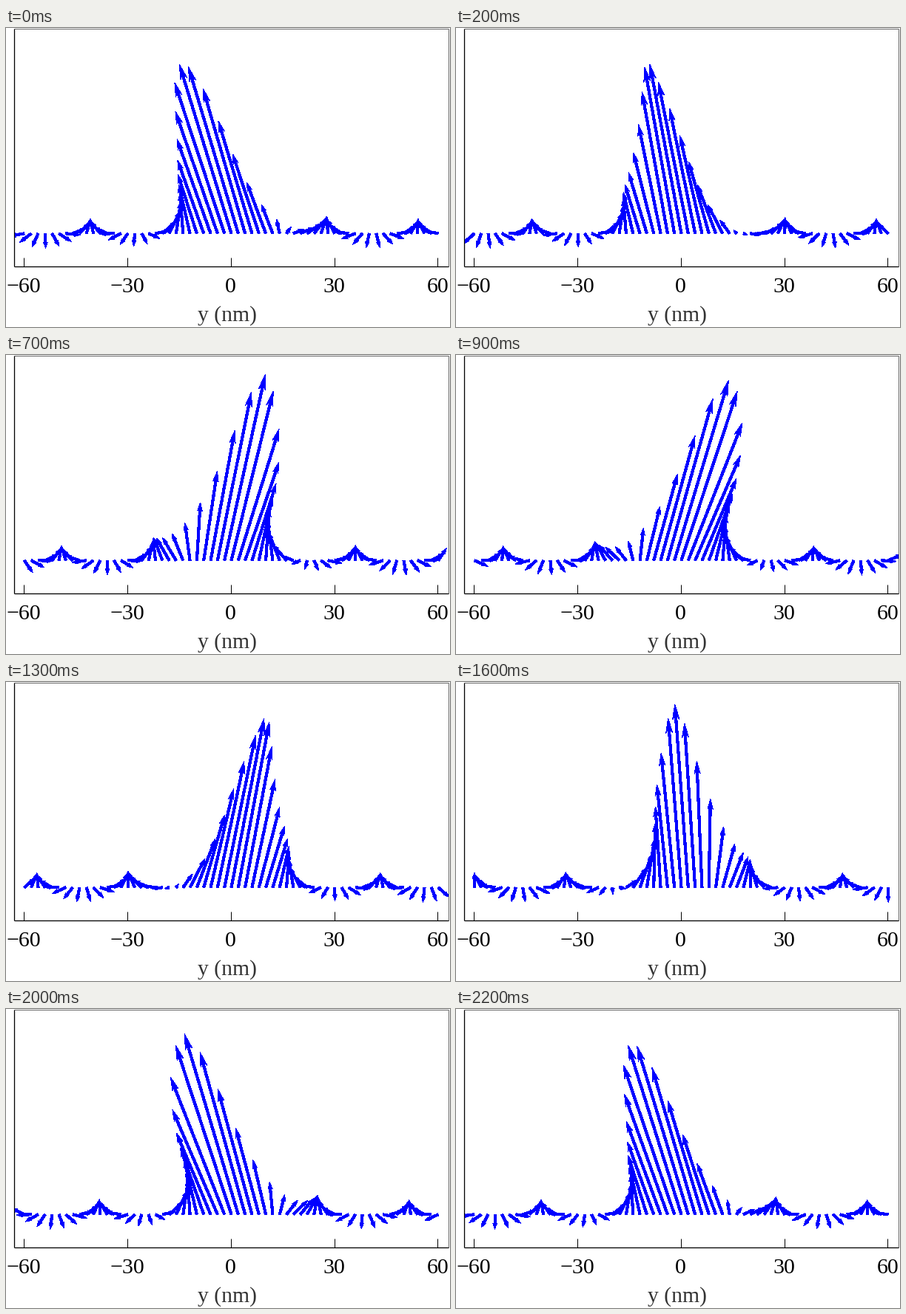
These frames come from a looping animation (600 px wide and 405 px high, 2300 ms). A matplotlib script:

```python
import numpy as np
import matplotlib.pyplot as plt
from matplotlib.animation import FuncAnimation
from matplotlib.collections import PolyCollection
from matplotlib.patches import Rectangle

W, H, DPI = 600, 405, 60
PT = 72 / DPI
FRAMES, STEP = 23, 100
LEFT, RIGHT, TOP, BOTTOM = 11, 598, 1, 323
CENTER, BASE = 304.5, 278.3
TICK_CENTER = 303.8
PITCH = 9.32            # pixels between arrows, 2 nm
PERIOD = 22.2           # in frames

n = np.arange(-30, 31)
s = n / 2.79
k = 2 * np.pi / 13.24

# Domain wall with an outgoing wave and a mode bound to the wall
sech = 1 / np.cosh(s)
wall = 229 * sech
bound = sech ** 1.55
wave = 20 * np.exp(1j * (k * abs(n) - 0.284))
wave = wave + 12 * sech - 1j * (18.5 + 5.7 * abs(n)) * bound
near = -94.3j * bound


def field(frame):
    turn = np.exp(-2j * np.pi * frame / PERIOD)
    vx = (1j * (wave - near) * turn).real
    vy = wall + np.tanh(s) * ((wave + near) * turn).real
    return vx, vy


def arrows(frame):
    """Outlines of all arrows in pixel coordinates."""
    vx, vy = field(frame)
    length = np.maximum(np.hypot(vx, vy), 1e-6)
    ux, uy = vx / length, -vy / length
    full = 7 + 0.055 * length
    head = np.minimum(full, length)
    half = (2.6 + 0.0085 * length) * head / full
    shaft = np.minimum(1.6, 0.9 * half)
    neck = length - 0.78 * head
    back = length - head
    zero = np.zeros_like(length)
    along = np.stack([zero, neck, back, length, back, neck, zero], axis=1)
    side = np.stack([shaft, shaft, half, zero, -half, -shaft, -shaft], axis=1)
    x = (CENTER + PITCH * n)[:, None] + along * ux[:, None] - side * uy[:, None]
    y = BASE + along * uy[:, None] + side * ux[:, None]
    return np.stack([x, y], axis=2)


fig = plt.figure(figsize=(W / DPI, H / DPI), dpi=DPI, facecolor="white")
ax = fig.add_axes([0, 0, 1, 1])
ax.set_xlim(0, W)
ax.set_ylim(H, 0)
ax.axis("off")


def line(x, y, color="black", width=1):
    ax.plot(x, y, color=color, lw=width * PT, solid_capstyle="butt", zorder=1)


def label(x, y, text, size, color):
    ax.text(x, y, text, family="Liberation Serif", fontsize=size * PT,
            color=color, ha="center", va="baseline")


line([LEFT, RIGHT], [TOP, TOP], "0.4")
line([RIGHT, RIGHT], [TOP, BOTTOM], "0.4")
line([LEFT, LEFT], [TOP, BOTTOM], width=1.3)
line([LEFT, RIGHT], [BOTTOM, BOTTOM], width=1.3)

for nm in range(-60, 61, 30):
    x = TICK_CENTER + PITCH * nm / 2
    line([x, x], [BOTTOM, BOTTOM - 12])
    label(x, 358, str(nm).replace("-", "\u2212"), 30, "black")
label(299, 396.5, "y (nm)", 29.6, "#333333")

vectors = PolyCollection(arrows(0), facecolor="#0000ff", edgecolor="none",
                         antialiased=False, zorder=2)
ax.add_collection(vectors, autolim=False)
box = Rectangle((LEFT + 0.5, TOP), RIGHT - LEFT - 1, BOTTOM - TOP,
                transform=ax.transData)
vectors.set_clip_path(box)


def update(frame):
    vectors.set_verts(arrows(frame))
    return [vectors]


anim = FuncAnimation(fig, update, frames=FRAMES, interval=STEP,
                     init_func=lambda: update(0), repeat=True, repeat_delay=0)
plt.show()
```
